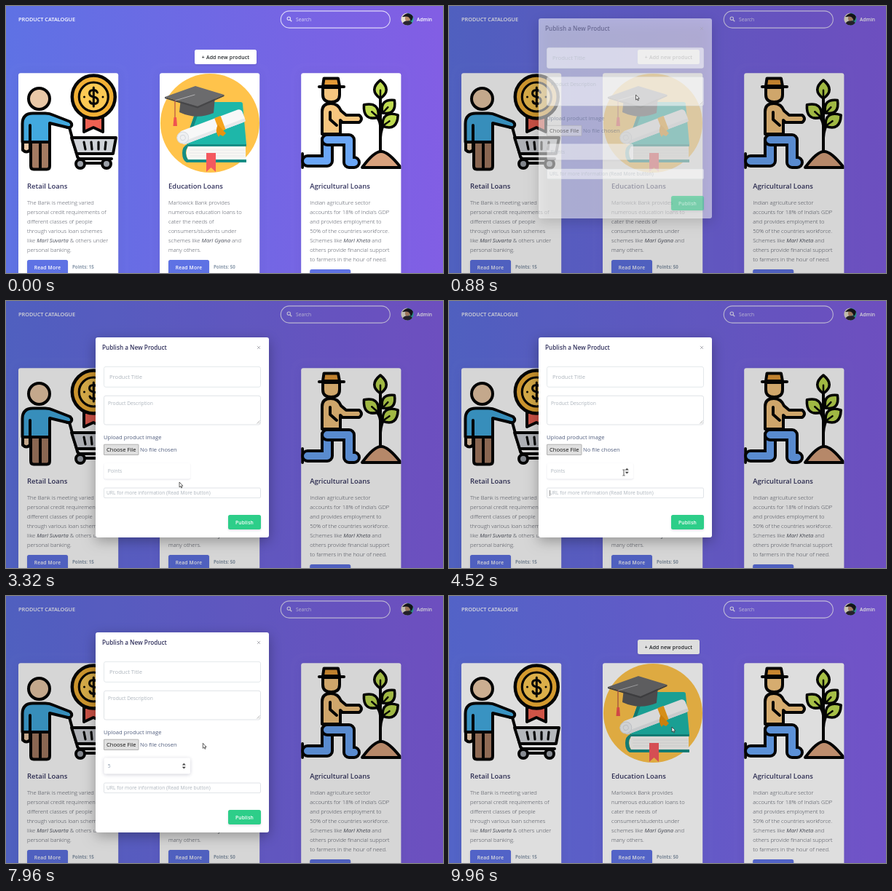
An HTML page with a canvas for the animation above (10000 ms loop, 600x367 px).

```html
<!DOCTYPE html>
<html lang="en">
<head>
<meta charset="utf-8">
<title>Product catalogue</title>
<style>
html, body { margin: 0; width: 100%; height: 100%; overflow: hidden; background: #5e72e4; }
canvas { display: block; width: 600px; height: 367px; }
</style>
</head>
<body>
<canvas id="stage"></canvas>
<script>
const W = 600, H = 367, LOOP = 10000;
const canvas = document.getElementById('stage');
const ratio = window.devicePixelRatio || 1;
canvas.width = W * ratio;
canvas.height = H * ratio;
const ctx = canvas.getContext('2d');
const FAMILY = '"Open Sans", "Noto Sans", sans-serif';
const NAVY = '#32325d', SLATE = '#525f7f', BODY = '#4f535f', MUTED = '#adb5bd', PRIMARY = '#5e72e4', INK = '#050505';

const clamp = v => Math.max(0, Math.min(1, v));
const ramp = (t, start, length) => clamp((t - start) / length);
const easeOut = p => 1 - (1 - p) ** 2.2;
const smooth = p => p * p * (3 - 2 * p);

function text(str, x, y, size, color, weight = 400, align = 'left', spacing = 0) {
  ctx.font = `${weight} ${size}px ${FAMILY}`;
  ctx.letterSpacing = `${spacing}px`;
  ctx.textAlign = align;
  ctx.fillStyle = color;
  ctx.fillText(str, x, y);
  const width = ctx.measureText(str).width;
  ctx.letterSpacing = '0px';
  return width;
}

function box(x, y, w, h, r, fill, stroke, lineWidth = 0.6) {
  ctx.beginPath();
  ctx.roundRect(x, y, w, h, r);
  if (fill) { ctx.fillStyle = fill; ctx.fill(); }
  if (stroke) { ctx.strokeStyle = stroke; ctx.lineWidth = lineWidth; ctx.stroke(); }
}

function shadowed(color, blur, dy, draw) {
  ctx.save();
  ctx.shadowColor = color;
  ctx.shadowBlur = blur * ratio;
  ctx.shadowOffsetY = dy * ratio;
  draw();
  ctx.restore();
}

function shape(d, fill, stroke, lineWidth = 4) {
  const path = new Path2D(d);
  if (fill) { ctx.fillStyle = fill; ctx.fill(path); }
  if (stroke) { ctx.strokeStyle = stroke; ctx.lineWidth = lineWidth; ctx.stroke(path); }
}
const inked = (d, fill, width = 4) => shape(d, fill, INK, width);

// A rounded tube with an ink outline
function limb(d, color, width) {
  shape(d, null, INK, width);
  shape(d, null, color, width - 8);
}

function disc(x, y, r, fill, stroke, lineWidth = 4) {
  ctx.beginPath();
  ctx.arc(x, y, r, 0, Math.PI * 2);
  if (fill) { ctx.fillStyle = fill; ctx.fill(); }
  if (stroke) { ctx.strokeStyle = stroke; ctx.lineWidth = lineWidth; ctx.stroke(); }
}

function button(label, x, y, w, h, fill, color, size = 6.7) {
  shadowed('rgba(50,50,93,.15)', 3, 1.5, () => box(x, y, w, h, 2.5, fill));
  text(label, x + w / 2, y + h / 2 + 2.5, size, color, 600, 'center', 0.17);
}

// Illustrations
function drawShopper() {
  inked('M34 180V220Q34 224.5 38 224.5H56Q60 224.5 60 220V180Z', '#a47b62');
  inked('M47 190V224');
  inked('M23 184H33V198Q28 203 23 198Z', '#e9c8a7');
  inked('M22.5 187V162Q22.5 147.5 37 147.5H54Q60 147.5 65 150L88 159Q93 164 87 167.5L60 161V187H33V164V187Z', '#42a9df');
  disc(45.5, 127.5, 14.5, '#e9c8a7', INK);
  inked('M107 153V173L120 167L133 173V153Z', '#ef6152');
  disc(120.3, 125, 29.5, '#f2b035', INK, 4.5);
  disc(120.3, 125, 20, '#fcc954', INK, 3.2);
  inked('M125.5 119Q124 115.5 120.3 115.5Q114.5 115.5 114.5 120Q114.5 124 120.3 125Q126.2 126 126.2 130Q126.2 134.5 120.3 134.5Q116 134.5 115 131M120.3 112V138', null, 3);
  for (const x of [107.5, 133]) disc(x, 125, 1.5, INK);
  inked('M84 167H87L98 207Q99 210 102 210H145', null);
  inked('M90 181H151L147 203H97Z', '#cfd2d7');
  inked('M107 187L109 197M117 187L118 197M127 187V197M137 187L136 197', null, 3.2);
  inked('M109 216H130', null);
  for (const x of [102, 138]) disc(x, 217, 6, '#9ba0a8', INK);
}

function drawGraduation() {
  disc(280, 161, 68, '#ffc34b');
  shape('M265 132H322Q325 132 325 135L330 190H252Q244 190 248 180Z', '#1eb7a9');
  shape('M265 132L248 180Q245 187 249 190L269 134Z', '#15877f');
  shape('M249 190H330V193H250Q244 202 250 211H330V215H248Q242 212 242 202Q242 193 249 190Z', '#168d84');
  shape('M250 193H329V211H250Q245 202 250 193Z', '#f8f7f3');
  shape('M253 198H328M252 202H329M253 206H328', null, '#e4e5e7', 0.9);
  shape('M275 202H288V228L281.5 222L275 228Z', '#f4595f');
  ctx.save();
  ctx.translate(284, 165.5);
  ctx.rotate(-0.36);
  box(-47, -9.5, 92, 19, 5, '#f8f8f8');
  box(-47, 5, 92, 4.5, 2.5, '#e6e8ea');
  disc(-44, 0, 8, '#eef0f2', '#d8dbe0', 1);
  disc(-44, 0, 3.5, null, '#d8dbe0', 1);
  box(6, -10, 9, 20, 1, '#f6a41d');
  ctx.restore();
  shape('M291 163L302 175L298 179L294 177L292 180Q286 172 291 163Z', '#e8930f');
  shape('M240 127L238 146Q262 157 285 147L287 125Z', '#565658');
  shape('M218 125L260 110L299.5 122L263 138Z', '#6b6b6d');
  shape('M218 125L263 138L299.5 122V124L263 140.5L218 127Z', '#464648');
  shape('M259 122L232 130', null, '#b9b9bb', 0.9);
  shape('M232 130V154', null, '#a33b43', 1);
  shape('M230.5 153H234L235 165H229.5Z', '#ef5350');
}

function leaf(x, y, length, width, angle) {
  ctx.save();
  ctx.translate(x, y);
  ctx.rotate(angle);
  const l = -length;
  inked(`M0 0C${-width} ${l * .3} ${-width} ${l * .65} 0 ${l}C${width} ${l * .65} ${width} ${l * .3} 0 0Z`, '#bfdb50', 3.6);
  inked(`M0 0V${l * .45}`, null, 2.5);
  ctx.restore();
}

function drawFarmer() {
  limb('M441 184V213H414', '#6aa6f7', 18);
  limb('M441 184H471V215H478', '#6aa6f7', 18);
  inked('M407 203V222', null);
  inked('M434 176V145Q434 134 446 134Q456 134 460 144L467 150H485Q491 155 485 160H462L459 157V176Z', '#f6c67f');
  inked('M445 146V156L454 164', null);
  inked('M435 112H458V122Q458 132 446.5 132Q435 132 435 122Z', '#f6c67f');
  inked('M435 110L436.5 99.5H456L458 110Z', '#e59a37');
  inked('M430 111H464', null, 4.2);
  inked('M489 222Q505 200 515 200Q525 200 542 222Z', '#d9a27d');
  inked('M514 200V126M514 164Q513 156 508 151M514 181Q515 166 521 160', null);
  leaf(514, 127, 25, 11, 0);
  leaf(511, 153, 26, 12, -0.85);
  leaf(517, 147, 24, 11, 0.75);
  leaf(517, 165, 26, 12, 0.95);
}

const cards = [
  { x: 17, title: 'Retail Loans', points: 15, art: drawShopper, lines: [
    'The Bank is meeting varied', 'personal credit requirements of', 'different classes of people',
    'through various loan schemes', 'like *Marl Suvarta* & others under', 'personal banking.'] },
  { x: 211, title: 'Education Loans', points: 50, art: drawGraduation, lines: [
    'Marlowick Bank provides', 'numerous education loans to', 'cater the needs of',
    'consumers/students under', 'schemes like *Marl Gyana* and', 'many others.'] },
  { x: 405.2, title: 'Agricultural Loans', points: 20, art: drawFarmer, lines: [
    'Indian agriculture sector', 'accounts for 18% of India\'s GDP', 'and provides employment to',
    '50% of the countries workforce.', 'Schemes like *Marl Kheta* and', 'others provide financial support', 'to farmers in the hour of need.'] }
];

function drawCard({ x, title, points, art, lines }) {
  shadowed('rgba(60,70,110,.1)', 12, 0, () => box(x, 92.2, 137.2, 300, 3, '#fff'));
  ctx.save();
  ctx.beginPath();
  ctx.roundRect(x, 92.2, 137.2, 300, 3);
  ctx.clip();
  ctx.lineJoin = ctx.lineCap = 'round';
  art();
  ctx.restore();
  const left = x + 12;
  text(title, left, 250.8, 9.45, NAVY, 600);
  lines.forEach((line, row) => {
    let pen = left;
    line.split('*').forEach((part, i) => {
      pen += text(part, pen, 272.8 + row * 13, 7.65, BODY, i % 2 ? 'italic 400' : 300);
    });
  });
  const top = 349 + (lines.length - 6) * 13;
  button('Read More', left, top, 56, 21, PRIMARY, '#fff');
  text(`Points: ${points}`, left + 62, top + 12.2, 6.15, '#8898aa', 700);
}

function drawAvatar() {
  ctx.save();
  ctx.beginPath();
  ctx.arc(551, 18, 8.6, 0, Math.PI * 2);
  ctx.clip();
  ctx.fillStyle = '#e6e0cf';
  ctx.fillRect(542, 9, 9, 18);
  ctx.fillStyle = '#2fa9a0';
  ctx.fillRect(551, 9, 9, 18);
  shape('M543 27Q545 20 552 20Q558 20 559 27Z', '#2a2630');
  disc(551.5, 17, 3.6, '#b98b6c');
  shape('M544 15Q551 6 559 14Q558 20 555.5 21Q555 15 550 14.5Z', '#18171d');
  ctx.restore();
}

function drawPage() {
  const sky = ctx.createLinearGradient(0, 199, W, 168);
  sky.addColorStop(0, '#5e72e4');
  sky.addColorStop(1, '#825ee4');
  ctx.fillStyle = sky;
  ctx.fillRect(0, 0, W, H);
  text('PRODUCT CATALOGUE', 17, 20.8, 7.3, '#fff', 600);
  box(377.3, 6.9, 150, 23.2, 11.6, null, 'rgba(255,255,255,.75)', 1.1);
  disc(388.3, 17.2, 2.2, null, 'rgba(255,255,255,.8)', 1.1);
  shape('M390 19L392.3 21.3', null, 'rgba(255,255,255,.8)', 1.3);
  text('Search', 398, 20.8, 6.7, 'rgba(255,255,255,.75)');
  drawAvatar();
  text('Admin', 564, 20.8, 6.7, '#fff', 600);
  button('+ Add new product', 259, 60, 85, 20, '#fff', '#212529', 6.9);
  cards.forEach(drawCard);
}

// Form state
const OPEN = 800, CLOSE = 9680;
const FOCUS = [['description', 1120], ['url', 2500], ['points', 6400]];
const STEPS = [6400, 6920, 6990, 7060, 7130, 7200];

function formState(t) {
  const [field, since] = FOCUS.filter(f => t >= f[1]).pop() || ['', 0];
  const done = STEPS.filter(s => t >= s);
  const blinkFrom = done.length ? done[done.length - 1] : since;
  return { field, value: done.length ? String(done.length - 1) : '', caret: (t - blinkFrom) % 1000 < 500 };
}

function drawModal(t) {
  const closing = t >= CLOSE;
  const alpha = closing ? 1 - ramp(t, CLOSE, 150) : ramp(t, OPEN, 150);
  if (!alpha) return;
  const shift = closing ? easeOut(ramp(t, CLOSE, 300)) : 1 - easeOut(ramp(t, OPEN, 280));
  const { field, value, caret } = formState(t);
  const onCaret = (name, x, y, h) => {
    if (caret && field === name) { ctx.fillStyle = '#555'; ctx.fillRect(x, y, 0.6, h); }
  };
  const input = (name, x, y, w, h) => shadowed(`rgba(50,50,93,${field === name ? .24 : .13})`, field === name ? 5 : 2, 1,
    () => box(x, y, w, h, 2.2, '#fff'));

  ctx.save();
  ctx.globalAlpha = alpha;
  ctx.translate(0, -69 * shift);
  shadowed('rgba(0,0,0,.3)', 18, 5, () => box(123, 50, 238, 275, 3, '#fff'));
  text('Publish a New Product', 132, 67, 8.2, NAVY, 600);
  shape('M344.9 61.9L349 66M349 61.9L344.9 66', null, '#a0a0a8', 0.8);

  box(134.5, 90.3, 215, 28, 2.5, '#fff', '#dee2e6', 0.8);
  text('Product Title', 142, 107, 7.65, MUTED);
  box(134.5, 130.3, 215, 39.7, 2.5, '#fff', '#d8dce1', 0.8);
  text('Product Description', 140, 142.6, 6.7, MUTED);
  shape('M344.5 168.5L348.5 164.5M347 168.5L348.5 167', null, '#888', 0.6);
  onCaret('description', 140.4, 136, 8);

  text('Upload product image', 134, 190, 7.65, SLATE);
  box(134.5, 197.2, 47.5, 14.3, 0.5, '#dfdfdf', '#a3a3a3', 0.8);
  text('Choose File', 158.2, 207, 7.6, '#111', 400, 'center');
  text('No file chosen', 184, 207, 7.65, SLATE);

  input('points', 134.5, 222.5, 118.5, 22);
  text(value || 'Points', 139.8, 236.2, 6.7, value ? '#8898aa' : MUTED);
  onCaret('points', 144, 230, 8);
  if (t >= 4240) shape('M241.8 232.5L244.3 229.8L246.8 232.5ZM241.8 234.7L244.3 237.4L246.8 234.7Z', '#444');

  box(134.5, 257, 215, 13.6, 1.5, '#fff', '#d8dce1', 0.8);
  text('URL for more information (Read More button)', 138, 266.3, 6.7, MUTED);
  onCaret('url', 138, 260, 8);
  button('Publish', 305, 294, 45, 20, '#2dce89', '#fff');
  ctx.restore();
}

// Pointer: time, x, y
const ROUTE = [
  [0, 300, 374], [440, 286, 72], [620, 286, 72], [720, 272, 102], [1080, 235, 150], [1760, 235, 150],
  [2120, 268, 271.5], [2440, 255, 264], [3000, 255, 264], [3960, 189.5, 206], [4079, 189.5, 206],
  [4080, 228, 236], [4380, 228, 236], [4520, 240, 236], [5120, 244, 231], [7480, 244, 231],
  [8480, 300, 170], [9140, 346.7, 66], [9640, 346.7, 66], [9960, 306, 180], [10000, 304, 186]
];

function pointerAt(t) {
  const i = Math.max(1, ROUTE.findIndex(p => p[0] >= t));
  const [t0, x0, y0] = ROUTE[i - 1], [t1, x1, y1] = ROUTE[i];
  const p = smooth(ramp(t, t0, t1 - t0));
  return [x0 + (x1 - x0) * p, y0 + (y1 - y0) * p];
}

const within = (x, y, l, t, r, b) => x >= l && x <= r && y >= t && y <= b;

function pointerKind(x, y, t) {
  if (t < 680) return within(x, y, 259, 60, 344, 80) ? 'hand' : 'arrow';
  if (t >= CLOSE) return 'arrow';
  if (within(x, y, 342, 59, 352, 70)) return 'hand';
  const typing = within(x, y, 134, 90, 350, 118) || within(x, y, 134, 130, 350, 170) ||
    within(x, y, 134, 222, 241, 244) || within(x, y, 134, 257, 350, 271);
  return typing ? 'beam' : 'arrow';
}

function drawPointer(t) {
  const [x, y] = pointerAt(t);
  const kind = pointerKind(x, y, t);
  ctx.save();
  ctx.translate(x, y);
  ctx.lineJoin = 'round';
  if (kind === 'beam') shape('M-1.6 -4H-.4L0 -3.6L.4 -4H1.6M0 -3.6V3.6M-1.6 4H-.4L0 3.6L.4 4H1.6', null, '#333', 0.8);
  else if (kind === 'hand') shape('M-.8 .6Q0 -.6 .8 .6V3.2L3.4 3.8Q4 4 3.9 5L3.3 8H-.6L-2.6 5.2Q-2.4 4.2 -.8 5.3Z', '#fff', '#222', 0.8);
  else shape('M0 0V7L1.6 5.6L2.7 8L3.8 7.5L2.7 5.2H4.8Z', '#fff', '#222', 0.7);
  ctx.restore();
}

function render(t) {
  ctx.setTransform(ratio, 0, 0, ratio, 0, 0);
  drawPage();
  const dim = 0.16 * ramp(t, 640, 160) * (1 - ramp(t, 9930, 150));
  ctx.fillStyle = `rgba(0,0,0,${dim})`;
  ctx.fillRect(0, 0, W, H);
  drawModal(t);
  drawPointer(t);
}

let start;
function tick(now) {
  start ??= now;
  render((now - start) % LOOP);
  requestAnimationFrame(tick);
}
render(0);
requestAnimationFrame(tick);
</script>
</body>
</html>
```
